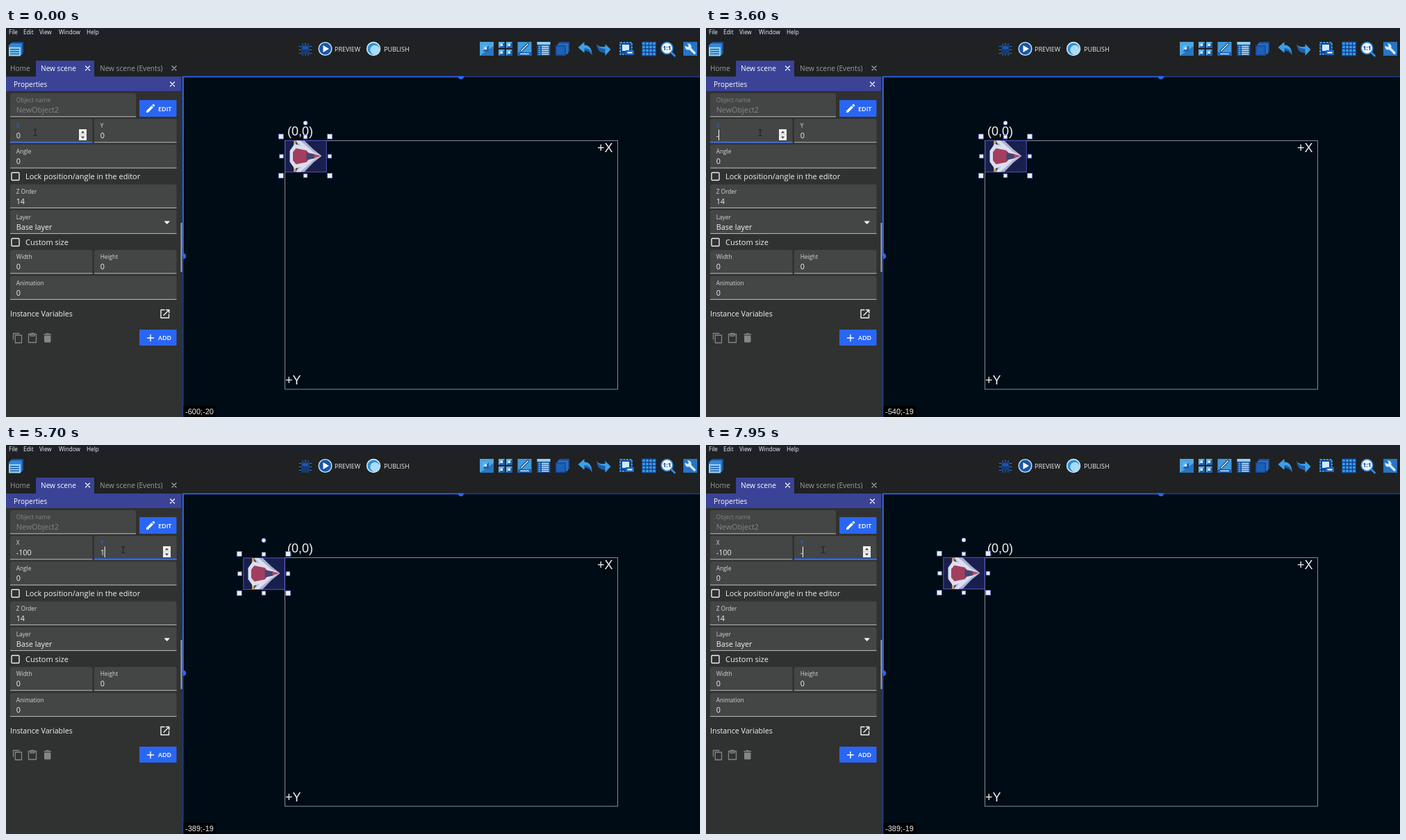
An HTML page that plays this animation: 999 px wide and 561 px high, repeating every 8000 ms.

```html
<!DOCTYPE html>
<html lang="en">
<head>
<meta charset="utf-8">
<title>Scene editor</title>
<style>
  html, body { margin: 0; width: 100%; height: 100%; overflow: hidden; background: #303131; }
  svg { display: block; width: 999px; height: 561px; }
  text { font-family: "Open Sans", "Noto Sans", sans-serif; fill: #f2f2f2; white-space: pre; }
  .menu { font-size: 8.2px; }
  .tool { font-size: 9px; }
  .tab { font-size: 10.15px; fill: #9c9c9c; }
  .label { font-size: 8.3px; fill: #d6d6d6; }
  .value { font-size: 10.8px; }
  .button { font-size: 9px; font-weight: 600; fill: #fff; }
  .off text { fill: #858686; }
  .scene { font: 18px "Liberation Sans", Arial, sans-serif; fill: #f4f4f4; }
  .coords { font: 11px "Liberation Sans", Arial, sans-serif; fill: #eee; }
  .line { fill: none; stroke-linecap: round; stroke-linejoin: round; }
</style>
</head>
<body>
<svg id="stage" viewBox="0 0 999 561" xmlns="http://www.w3.org/2000/svg"></svg>
<script>
const LOOP = 8000, SCALE = 0.6, BLUE = '#2a66f4', SKY = '#55b4f0', NAVY = '#12479c';

const rect = (x, y, w, h, fill, more = '') =>
  `<rect x="${x}" y="${y}" width="${w}" height="${h}" fill="${fill}" ${more}/>`;
const text = (x, y, cls, str, more = '') => `<text x="${x}" y="${y}" class="${cls}" ${more}>${str}</text>`;
const shape = (d, fill, more = '') => `<path d="${d}" fill="${fill}" ${more}/>`;
const line = (d, color, width = 1.3) => `<path class="line" d="${d}" stroke="${color}" stroke-width="${width}"/>`;
const disc = (x, y, r, fill, more = '') => `<circle cx="${x}" cy="${y}" r="${r}" fill="${fill}" ${more}/>`;
const group = (x, y, body, more = '') => `<g transform="translate(${x} ${y})" ${more}>${body}</g>`;
const range = (n, make) => Array.from({ length: n }, (_, i) => make(i)).join('');

function field(x, y, w, label, value, id = '') {
  const mark = part => id ? `id="${id}${part}"` : '';
  const body =
    shape(`M0 34.5V3Q0 0 3 0H${w - 3}Q${w} 0 ${w} 3V34.5Z`, '#444545') +
    rect(0, 33.4, w, 1, '#bdbdbd') +
    (id ? rect(0, 32.6, w, 1.7, BLUE, mark('Bar')) : '') +
    text(8.7, 13, 'label', label, mark('Label')) +
    (id ? rect(8.5, 15.5, 0, 15.5, '#2a7ce0', mark('Pick')) : '') +
    text(8.7, 28, 'value', value, mark('Value')) +
    (id ? rect(0, 15.5, 1, 15.5, '#fff', mark('Caret')) + group(w - 19.5, 15, spinner, mark('Spin')) : '');
  return group(x, y, body);
}

const spinner = rect(0, 0, 11, 16, '#f0f0f0') + rect(0, 7.6, 11, .8, '#c4c4c4') +
  shape('M2.8 5.6L5.5 2.6L8.2 5.6Z M2.8 10.4L5.5 13.4L8.2 10.4Z', '#444');

const checkbox = (y, label) =>
  rect(8, y - 5.5, 11, 11, 'none', 'rx="1" stroke="#eee" stroke-width="1.4"') +
  text(28, y + 4, 'value', label, 'style="font-size:11px"');

const cross = (x, y, color) => line(`M${x - 3} ${y - 3}l6 6m0-6l-6 6`, color, 1.2);

const cube = (x, y, s) => rect(x, y, s, s, '#5fb2e8') +
  shape(`M${x + s} ${y}V${y + s}H${x}Z`, '#1d5fae') +
  rect(x + s * .3, y + s * .3, s * .38, s * .38, '#d8effb');

const topBar = () => {
  const menu = [[4, 'File'], [25, 'Edit'], [48, 'View'], [76, 'Window'], [116, 'Help']];
  const bug = line('M-9-4H9M-9 1H9M-9 6H9M-4-8V9M0-9V9M4-8V9', '#2a78c8', 1.1) +
    rect(-6, -6, 12, 13, '#163a78', 'rx="2"') + rect(-4, -4, 8, 4, '#1c58b0');
  const icons = [
    rect(0, 0, 20, 20, '#4ea6e2') + shape('M0 20L20 6V20Z', '#2a75bf') + cube(4, 5, 9),
    cube(0, 0, 9) + cube(11, 0, 9) + cube(0, 11, 9) + cube(11, 11, 9),
    rect(0, 0, 20, 20, '#3f9ada') + rect(0, 15, 20, 5, '#1d63b5') + line('M4 17.3H16', '#e6f5ff', 1.2) +
      line('M5 13L15 3', '#123a80', 3.6) + line('M5 13L15 3', '#d9effc', 1.6),
    rect(1, 0, 19, 20, '#164f9c') + rect(1, 0, 19, 4, '#8fd0f6') +
      range(5, i => rect(3, 5.7 + i * 2.8, 3, 1.6, SKY) + rect(7.5, 5.7 + i * 2.8, 10.5, 1.6, '#cfeafb')),
    rect(5, 0, 15, 15, '#1b4f9a') + rect(3, 2.5, 15, 15, '#2d6fba') + rect(0, 5, 15, 15, NAVY) + rect(1.5, 6.5, 12, 12, '#1d60b4'),
    shape('M0 8L9 0V4.5Q20 5 20 19Q16 12 9 12.5V16Z', '#3d9fe6') + shape('M9 9Q18 9 20 19Q16 12 9 12.5Z', '#1a5fae'),
    shape('M20 11L12 3V7Q1 8 0 3Q1 16 12 15.5V20Z', '#3d9fe6') + shape('M0 3Q2 10 12 10V15.5Q1 16 0 3Z', '#1a5fae'),
    rect(1, 1, 17, 17, NAVY, `stroke="${SKY}" stroke-width="1.5" stroke-dasharray="3 1.5"`) +
      rect(4, 4, 10, 9, '#cfeafb') + rect(9, 12, 12, 7, '#1c65c0') + rect(11.5, 14.5, 7, 2, '#fff'),
    rect(0, 0, 20, 20, '#3c9be8') + line(range(5, i => `M${i * 5} 0V20M0 ${i * 5}H20`), '#113f88', 1.3),
    line('M15 15L20 20', '#2f8bdc', 3) + disc(9, 9, 8.3, '#eef7fd', 'stroke="#2f8bdc" stroke-width="1.8"') +
      text(9, 12.2, '', '1:1', 'text-anchor="middle" style="font-size:8.5px;font-weight:700;fill:#123a80"'),
    rect(0, 0, 20, 20, '#2874c4') + line('M8 8L16 16', '#d4ecfb', 3.6) + disc(7, 7, 4.6, '#d4ecfb') + shape('M2 2H5L8 5.5L6 7.5L2 5Z', '#2874c4')
  ];
  const spots = [682, 709, 736.5, 763.5, 791, 823.5, 850.5, 883, 915.5, 942.5, 975];
  return rect(0, 0, 999, 12, '#1e2228') + menu.map(([x, s]) => text(x, 8.8, 'menu', s)).join('') +
    rect(0, 12, 999, 58, '#1f2122') +
    group(4, 20, rect(4, 0, 17, 17, '#164f9c') + rect(2, 2, 17, 17, '#2e7fd0') + rect(0, 4.5, 17, 16, '#8fd0f6') +
      rect(0, 4.5, 17, 3, '#2e7fd0') + range(3, i => rect(2, 10 + i * 3.3, 13, 1.5, '#1b5aa8'))) +
    group(431, 30.5, bug) +
    disc(459.5, 30, 9.3, '#1a55a8', 'stroke="#b5ddf6" stroke-width="1.6"') + shape('M456.5 25L465 30L456.5 35Z', '#fff') +
    text(473, 33.6, 'tool', 'PREVIEW') +
    disc(529, 30, 9.4, '#2d8fda', 'stroke="#d4ecfa" stroke-width="1.6"') + disc(531, 31.5, 6.8, '#a9dcf8') +
    text(544, 33.6, 'tool', 'PUBLISH') +
    icons.map((body, i) => group(spots[i], 20, body)).join('') +
    text(6, 62.3, 'tab', 'Home') +
    rect(43, 47, 84, 23, '#3a4396') +
    text(50, 62.3, 'tab', 'New scene', 'style="fill:#fff;font-weight:500"') + cross(117.5, 58, '#fff') +
    text(135, 62.3, 'tab', 'New scene (Events)') + cross(242, 58, '#aaa');
};

const panel = () =>
  rect(0, 70, 254, 491, '#303131') + rect(0, 70, 252, 21, '#3a4396') +
  text(11, 84.5, 'value', 'Properties', 'style="font-size:10px;fill:#fff"') + cross(239.5, 81, '#fff') +
  `<g class="off">${field(6, 94, 181, 'Object name', 'NewObject2')}</g>` +
  rect(192, 104, 53.5, 24, BLUE, 'rx="1"') + text(219, 119.5, 'button', 'EDIT') +
  group(202, 110, shape('M0 9.5V12H2.5L10 4.5L7.5 2ZM8.3 1.2L10.8 3.7L12 2.5Q12.5 1.8 12 1.2L10.8 0Q10.2-.5 9.5 0Z', '#fff')) +
  field(6, 131, 118.5, 'X', '0', 'x') + field(127, 131, 118.5, 'Y', '0', 'y') +
  field(6, 168, 239.5, 'Angle', '0') + checkbox(214, 'Lock position/angle in the editor') +
  field(6, 225.5, 239.5, 'Z Order', '14') + field(6, 262.5, 239.5, 'Layer', 'Base layer') +
  shape('M227.5 278.5H236L231.7 283Z', '#fff') + checkbox(309, 'Custom size') +
  field(6, 320, 118.5, 'Width', '0') + field(127, 320, 118.5, 'Height', '0') + field(6, 357.5, 239.5, 'Animation', '0') +
  text(6, 416.3, 'value', 'Instance Variables', 'style="font-size:10.65px"') +
  line('M228 406.5H223V418H234.5V413M230.5 406.5H234.8V410.8M234.5 406.8L227 414.3', '#f4f4f4', 1.4) +
  line('M10.5 449V440.5H19M13.3 443H22.5V454H13.3Z', '#858686') +
  line('M32.5 441.5H43.5V453.5H32.5ZM35 441.5V444H41V441.5M36 440.5H40', '#858686') +
  shape('M55 443.5H64.5V452Q64.5 453.5 63 453.5H56.5Q55 453.5 55 452ZM54.5 441H57.5L58.3 440H61.3L62 441H65V442.4H54.5Z', '#858686') +
  rect(192, 435, 53.5, 23, BLUE, 'rx="1"') + line('M203.5 447H212.5M208 442.5V451.5', '#fff', 1.4) +
  text(219, 450.3, 'button', 'ADD') + rect(251.5, 281, 2, 71, '#a0a1a1');

const ship =
  rect(.3, .3, 59.4, 45.4, '#191f4d', 'stroke="#4f55c4" stroke-width="1"') +
  shape('M12.5 .5H16V45.5H12.5Z', '#c9a04a') +
  shape('M15.5 .5H28L41 13L53 22.5L41 32L28 45.5H15.5L20 37V9Z', '#a9afd2') +
  shape('M16 .5H22L40 16L24 9ZM16 45.5H22L40 30L24 37Z', '#dcdff0') +
  shape('M7 15L14 5L26 9L52 22.5L26 37L14 41L7 31Z', '#dcdff0') +
  shape('M11.5 17L16 11.5L31 14.5L34 18V28L31 31.5L16 34.5L11.5 29Z', '#a33f5e') +
  shape('M31 17.5L43 20V26L31 28.5Z', '#454470') + shape('M42 19.7L52 22.5L42 26Z', '#b24a66');

const handle = (x, y, s) => rect(x - s / 2, y - s / 2, s, s, '#eceef8', 'stroke="#5960cc" stroke-width=".7"');
const handles =
  [[-5.7, -5.5], [64.7, -5.5], [-5.7, 51], [64.7, 51]].map(([x, y]) => handle(x, y, 7)).join('') +
  [[-5, 23], [64.5, 23], [29.5, -5], [29.5, 51]].map(([x, y]) => handle(x, y, 5.6)).join('') +
  disc(29.5, -25, 3, '#eceef8', 'stroke="#5960cc" stroke-width=".7"');

const canvas = () =>
  rect(254, 70, 745, 491, '#000c15') +
  rect(401.5, 162.5, 479, 358.5, 'none', 'stroke="#868b91" stroke-width="1"') +
  text(405, 154.8, 'scene', '(0,0)') + text(851, 179, 'scene', '+X') + text(402, 514, 'scene', '+Y') +
  group(401.5, 162, ship + handles, 'id="ship"') +
  rect(254, 69.6, 745, 1.4, '#173e9c') + rect(254, 69.6, 401, 1.6, BLUE) + shape('M650.5 69.6H659.3A4.4 4.4 0 0 1 650.5 69.6Z', BLUE) +
  rect(254, 70, 1.6, 491, '#173e9c') + rect(254, 70, 1.8, 259, BLUE) +
  shape('M255 324.7A4.3 4.3 0 0 1 255 333.3Z', BLUE) +
  rect(255.5, 545, 46.5, 16, '#000') + text(258, 557, 'coords', '-600;-20', 'id="coords"');

const cursor = line('M-2-4.5Q-.4-4.5 0-3.8Q.4-4.5 2-4.5M0-3.8V3.8M-2 4.5Q-.4 4.5 0 3.8Q.4 4.5 2 4.5', '#161717', .9);

document.getElementById('stage').innerHTML = topBar() + canvas() + panel() + group(0, 0, cursor, 'id="cursor"');
const el = id => document.getElementById(id);

// Each track lists [start time, ...value]; a value holds until the next entry.
const xTyped = [[0, '0'], [1400, '1'], [1660, '10'], [1790, '100'], [3600, '-'], [3860, '-1'], [4060, '-10'], [4390, '-100']];
const yTyped = [[0, '0'], [5700, '1'], [5960, '10'], [6090, '100'], [7950, '-']];
const pointer = [[0, 41.5, 150], [2250, 59, 150], [2320, 65, 150], [2590, 70, 150.6], [2660, 75, 150.6], [2730, 77.5, 150.6],
  [4610, 84, 150.6], [4680, 106, 150.6], [4750, 136, 150.6], [4820, 160, 150.6], [4880, 168.1, 150.6]];
const marks = [[0, 'off'], [130, 'caret'], [660, 'off'], [860, 'caret'], [930, 'pick'], [1400, 'caret'], [2320, 'off'],
  [2800, 'caret'], [2870, 'pick'], [3600, 'caret'], [4920, 'off'], [5220, 'caret'], [5360, 'pick'],
  [5700, 'caret'], [6620, 'off'], [6890, 'caret'], [6960, 'pick'], [7950, 'caret']];
const clicks = [790, 2740, 5160, 6890];
const FOCUS_Y = 5150;

const at = (track, t) => track.reduce((found, step) => step[0] <= t ? step : found, track[0]).slice(1);
const show = (node, on) => node.setAttribute('visibility', on ? 'visible' : 'hidden');

function drawField(id, value, focused, mark, grow, hovered) {
  const label = el(id + 'Value'), caret = el(id + 'Caret'), pick = el(id + 'Pick');
  if (label.textContent !== value) label.textContent = value;
  const width = label.getComputedTextLength();
  caret.setAttribute('x', 8.5 + width);
  pick.setAttribute('width', width + .3);
  show(caret, focused && mark === 'caret');
  show(pick, focused && mark === 'pick');
  show(el(id + 'Spin'), focused || hovered);
  el(id + 'Bar').setAttribute('transform', `translate(${59.25 * (1 - grow)} 0) scale(${grow} 1)`);
  el(id + 'Label').style.fill = focused ? '#2b66e0' : '';
}

function draw(t) {
  const [x] = at(xTyped, t), [y] = at(yTyped, t), [mark] = at(marks, t);
  const [px, py] = at(pointer, t), [seenX, seenY] = at(pointer, t - 67);
  const onY = t >= FOCUS_Y;
  const ease = 1 - (1 - Math.min(1, Math.max(0, (t - FOCUS_Y) / 200))) ** 3;
  drawField('x', x, !onY, mark, 1 - ease, false);
  drawField('y', y, onY, mark, ease, px > 127);

  const place = typed => (Number(typed) || 0) * SCALE;
  el('ship').setAttribute('transform', `translate(${401.5 + place(x)} ${162 + place(y)})`);
  el('coords').textContent = `${Math.round((seenX - 401.5) / SCALE)};${Math.round((seenY - 162) / SCALE)}`;

  const pulse = clicks.reduce((sum, c) => sum + (t > c && t < c + 200 ? Math.sin((t - c) / 200 * Math.PI) : 0), 0);
  el('cursor').setAttribute('transform', `translate(${px + .5} ${py + .5}) scale(${1 + .3 * pulse})`);
}

const start = performance.now();
function tick() {
  draw((performance.now() - start) % LOOP);
  requestAnimationFrame(tick);
}
tick();
</script>
</body>
</html>
```
